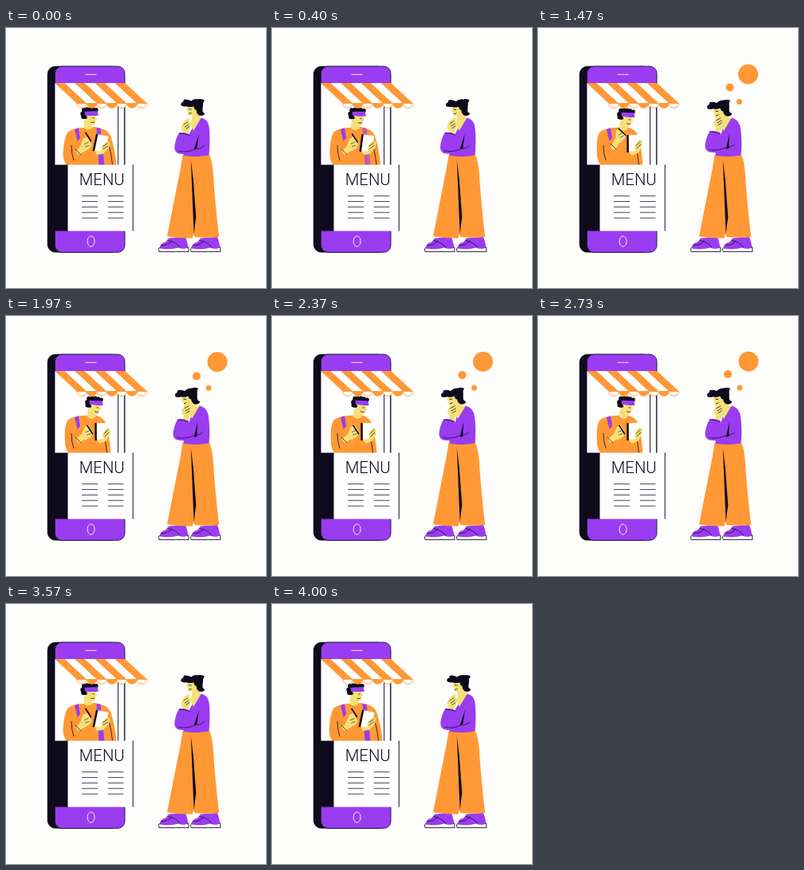
An HTML page with a canvas for the animation above (4060 ms loop, 326 by 326 pixels).

```html
<!DOCTYPE html>
<html lang="en">
<head>
<meta charset="utf-8">
<title>Menu stall</title>
<style>
html, body { margin: 0; width: 100%; height: 100%; overflow: hidden; background: #fdfdfb; }
canvas { display: block; width: 326px; height: 326px; }
</style>
</head>
<body>
<canvas id="stage"></canvas>
<script>
const SIZE = 326, LOOP = 4060;
const BG = '#fdfdfb', INK = '#0d0b1c', PURPLE = '#9a3cf0', ORANGE = '#ff9835', SKIN = '#f3e07a', WHITE = '#fefefe';

const canvas = document.getElementById('stage');
const ctx = canvas.getContext('2d');
const dpr = window.devicePixelRatio || 1;
canvas.width = canvas.height = Math.round(SIZE * dpr);

const clamp = v => Math.max(0, Math.min(1, v));
const mix = (a, b, k) => a + (b - a) * k;
const ramp = (t, a, b) => clamp((t - a) / (b - a));
const smooth = (t, a, b) => { const x = ramp(t, a, b); return x * x * (3 - 2 * x); };
const backIn = x => 2.7 * x * x * x - 1.7 * x * x;
const backOut = x => 1 - backIn(1 - x);

function fill(d, color) {
  ctx.fillStyle = color;
  ctx.fill(new Path2D(d));
}

function line(d, color = INK, width = 0.9) {
  ctx.strokeStyle = color;
  ctx.lineWidth = width;
  ctx.stroke(new Path2D(d));
}

function dot(x, y, r, color) {
  ctx.fillStyle = color;
  ctx.beginPath();
  ctx.arc(x, y, r, 0, Math.PI * 2);
  ctx.fill();
}

function box(x, y, w, h, color, r = 0) {
  ctx.fillStyle = color;
  ctx.beginPath();
  ctx.roundRect(x, y, w, h, r);
  ctx.fill();
}

// Draws inside a frame turned around (px, py) and shifted by (dx, dy)
function posed(px, py, dx, dy, deg, draw) {
  ctx.save();
  ctx.translate(px + dx, py + dy);
  ctx.rotate(deg * Math.PI / 180);
  ctx.translate(-px, -py);
  draw();
  ctx.restore();
}

function phone() {
  box(51.8, 47.8, 90, 233.7, INK, 10);
  box(61.3, 48, 87.7, 233.3, PURPLE, 9);
  ctx.strokeStyle = INK;
  ctx.lineWidth = 0.8;
  ctx.stroke();
  box(61.5, 69, 87, 104, WHITE);
  line('M99.5 58.3H113.5', WHITE, 0.9);
  ctx.strokeStyle = WHITE;
  ctx.lineWidth = 0.9;
  ctx.beginPath();
  ctx.ellipse(106.6, 267.5, 4.5, 6.6, 0, 0, Math.PI * 2);
  ctx.stroke();
  line('M140.5 98V172M148.4 98V172');
}

function counter() {
  box(61, 171.4, 17, 83, INK);
  box(77.5, 171.4, 82, 83, WHITE);
  line('M159.2 171.4V254.5', INK, 1);
  ctx.fillStyle = INK;
  ctx.font = '300 20.3px Roboto, "Open Sans", sans-serif';
  ctx.fillText('MENU', 91.8, 197);
  for (let i = 0; i < 5; i++) {
    const y = 210.6 + i * 6.9;
    line(`M95 ${y}H115M127.8 ${y}H147.4`, INK, 0.75);
  }
}

function awning() {
  const n = 7, w = 88 / n;
  for (let i = 0; i < n; i++) {
    const x = 61.2 + i * w, b = x + 27.5;
    const striped = i % 2 === 0;
    fill(`M${x} 69H${x + w}L${b + w} 94.5H${b}Z`, striped ? ORANGE : WHITE);
    const lip = `M${b} 94.5A${w / 2} 5.8 0 0 0 ${b + w} 94.5Z`;
    fill(lip, striped ? WHITE : ORANGE);
    line(lip, ORANGE, 0.9);
  }
}

function vendorHead(k) {
  posed(104, 124, 4 * k, 1.3 * k, 6 * k, () => {
    fill('M98.5 112L107 119L108.5 125Q103 130 97.5 125Z', SKIN);
    fill('M99.5 107L112.5 107L112.8 112L114.3 115L112.4 116.2Q112.5 121.5 108 122Q102 122.5 100 115Z', SKIN);
    for (let i = 0; i < 5; i++) dot(97.5 + i * 3.9, 102.6 - Math.sin(i * Math.PI / 4) * 1.2, 2.5, INK);
    fill('M95 103H115L114 107L98 110Z', INK);
    dot(96.2, 107.4, 2.9, INK);
    dot(97.2, 111, 3.1, INK);
    dot(99.8, 112, 2, INK);
    fill('M98.5 104.8L114.5 104L116 109.6Q107 110.8 99 109.2Z', PURPLE);
    line('M106.5 118Q109 119.7 111 117.8M108.5 113H110.5', INK, 0.8);
  });
}

function vendor(k, up) {
  const elbow = mix(71.5, 74, k), hem = mix(77, 79.5, k);
  const sh = mix(131, 125.5, k), edge = mix(138.5, 131.5, k);
  fill(`M${hem} 173Q${elbow} 167 ${elbow} 158Q72.5 139 77 131Q82 126 95 125L111 124Q${sh - 4} 126 ${sh} 135Q${edge - 1.5} 152 ${edge} 173Z`, ORANGE);
  fill('M86 127L91 125.3L93 138L89.5 142Z', PURPLE);
  ctx.globalAlpha = 1 - k;
  fill('M113.5 125L118.5 126L123.5 172H116.5Z', PURPLE);
  ctx.globalAlpha = 1;
  vendorHead(k);
  line(`M82 147Q82 158 85 166M${edge - 9} 149Q${edge - 6} 160 ${edge - 5} 172`, INK, 0.8);

  // Pad and the hand that holds it
  posed(119, 144, 0.5 * k, 0, -12 * k, () => {
    fill('M110 152L125 152L122 158L114 159Z', SKIN);
    fill('M115 133L128.5 136L125 155L110.5 153.5Z', WHITE);
    fill('M113 132.8L115.4 133L111 154.6L108.5 154Z', INK);
    fill('M119.5 148.5L126.5 141.5L130.3 143.5L129 150.5L123 156.5L119.5 154Z', SKIN);
    line('M121.5 148.5L127.5 144.5M121.5 152L128 147.7', INK, 0.7);
  });

  // Writing arm
  const hx = mix(99.5 + 2 * k, 102.5, up), hy = mix(145.5, 134, up);
  ctx.lineCap = 'round';
  line(`M${mix(92, 95, up)} ${mix(155, 149, up)}L${hx} ${hy + 2}`, SKIN, 7);
  line(`M${mix(87, 91, up)} ${mix(152, 145, up)}l7 7`, INK, 0.7);
  posed(hx, hy, 0, 0, -14 * up, () => {
    fill(`M${hx - 7} ${hy + 4}L${hx - 3} ${hy - 6}L${hx + 2} ${hy - 9}L${hx + 5} ${hy - 4}L${hx + 8} ${hy + 1}L${hx + 5} ${hy + 6}L${hx - 2} ${hy + 10}Z`, SKIN);
    line(`M${hx + 0.5} ${hy - 14 + 6 * k}L${hx + 7} ${hy - 4 + 6 * k}`, INK, 1.6);
    line(`M${hx - 1} ${hy}l4.5 -2M${hx} ${hy + 3.5}l4.5 -1.5`, INK, 0.6);
  });
  ctx.lineCap = 'butt';
}

function shoe(x) {
  const sole = `M${x + 1} 280.4Q${x - 0.5} 276 ${x + 3} 274L${x + 37.5} 274.5L${x + 38} 280.4Z`;
  fill(sole, WHITE);
  line(sole, INK, 0.9);
  fill(`M${x + 13} 263.5L${x + 34} 262Q${x + 36.5} 268 ${x + 37.5} 275.5Q${x + 31} 278 ${x + 25} 275.5Q${x + 15} 278.5 ${x + 2} 276.5Q${x + 1.5} 270 ${x + 9} 268.5Z`, PURPLE);
  line(`M${x + 3} 272.5Q${x + 13} 273 ${x + 17} 266.5M${x + 12} 266.5Q${x + 21} 268 ${x + 27} 275`, INK, 0.7);
}

function customerHead(k) {
  posed(242, 118, -4.7 * k, k, -7 * k, () => {
    fill('M234 105L243 106L243.8 113.5L236 125L232 120Z', SKIN);
    fill('M228 97L239 97L240 106L237 109.5Q232 111 229 109.6Q227.6 108 228.4 105L226 103Z', SKIN);
    fill('M219.5 97Q218.5 93 222.5 92.5Q221.5 89 226 89.5Q229.5 90 232 91.5Q236 88.5 241 89.2Q246 88.3 249 90.5Q246.5 93.5 247 97.5L246.3 103Q246.5 106.5 249.5 107Q247.5 111 242 109.5Q238.5 107 238.7 103Q236 102.5 235.5 98.5Q230 99.8 227 98.2Q222 99 219.5 97Z', INK);
    line('M229 101.3L232.5 102.3M229 107Q231 107.5 232.5 106.3', INK, 0.8);
  });
}

function customer(k) {
  shoe(191);
  shoe(231);
  fill('M221.5 159L254.5 158Q258.5 166 259.8 182Q262 220 267.2 262Q252 263.5 236.3 262L235.3 258L233.5 263.5Q217 264 202 261.3L219 175Z', ORANGE);
  fill('M231.8 165L234.8 190L238.3 237L235.6 258L233.8 215Z', INK);

  const nx = -2 * k;
  fill(`M${234 + nx} 125L${244.5 + nx} 112.5Q${252.5 + nx} 114 ${254.5 + nx / 2} 123Q256.5 141 254.5 159.5Q238 162.5 222.5 160L223 152L230 132Z`, PURPLE);
  fill(`M${240 + nx} 112L${244.5 + nx} 113L${235 + nx} 129L${232 + nx} 122Z`, SKIN);
  customerHead(k);

  // Raised forearm, hand and sleeve
  const up = -5 * k, hx = k;
  ctx.lineCap = 'round';
  line(`M224.5 136L${226.5 + hx} ${125 + up}`, SKIN, 7);
  ctx.lineCap = 'butt';
  posed(227, 121, hx, up, 8 * k, () => {
    fill('M219.5 124L222.5 117.5L228.5 113L231 114.8L229.5 117.5L232.5 119L231 127L226 130.5L221 129.5Z', SKIN);
    line('M222.5 121.5L228 117.5M224 124.5L229.5 120.5M225.5 127L230 123.5', INK, 0.7);
  });
  posed(222, 145, -1.8 * k, -2 * k, 0, () => {
    fill('M217 131.5Q224 130 231 134L232 145Q240 149.5 248 145.5L250 155.5Q235 160.5 222 158Q212 159 211.2 150Q212 140 217 131.5Z', PURPLE);
    line('M217 132Q224 132 230.5 134.5M216 154Q226 157 237 152Q245 151.5 248.5 147.5', INK, 0.7);
  });
  fill(`M${242 + nx} 133L239.3 151L235.8 151.8Z`, INK);
}

// Thought bubbles: radius, pop-in time, pop-out time, drift points
const driftTimes = [870, 1470, 1970, 2730, 3230];
const bubbles = [
  { r: 3.4, from: 500, to: 2830, path: [[252, 91.5], [252.5, 92.5], [254, 90.3], [253, 90], [250.3, 92]] },
  { r: 5.1, from: 590, to: 2950, path: [[241, 74], [240.5, 74.5], [239, 75.5], [238, 73], [238.4, 70.5]] },
  { r: 12.5, from: 765, to: 3000, path: [[261.7, 56], [263.5, 58], [265, 57.5], [264, 57], [262.8, 55.8]] }
];

function drift(path, t) {
  const last = path.length - 2;
  let i = 0;
  while (i < last && t > driftTimes[i + 1]) i++;
  const k = smooth(t, driftTimes[i], driftTimes[i + 1]);
  return [0, 1].map(a => mix(path[i][a], path[i + 1][a], k));
}

function thought(b, t) {
  const scale = backOut(ramp(t, b.from, b.from + 500)) - backIn(ramp(t, b.to, b.to + 560));
  if (t <= b.from || scale <= 0.005) return;
  const [x, y] = drift(b.path, t);
  dot(x, y, b.r * scale, ORANGE);
}

function render(t) {
  ctx.setTransform(dpr, 0, 0, dpr, 0, 0);
  box(0, 0, SIZE, SIZE, BG);
  const nod = smooth(t, 200, 700) - smooth(t, 2760, 3220);
  const ponder = smooth(t, 350, 800) - smooth(t, 1530, 1900);
  const lean = smooth(t, 250, 800) - smooth(t, 2950, 3530);
  phone();
  vendor(nod, ponder);
  counter();
  awning();
  customer(lean);
  bubbles.forEach(b => thought(b, t));
}

const start = performance.now();
function tick() {
  render((performance.now() - start) % LOOP);
  requestAnimationFrame(tick);
}
tick();
</script>
</body>
</html>
```
